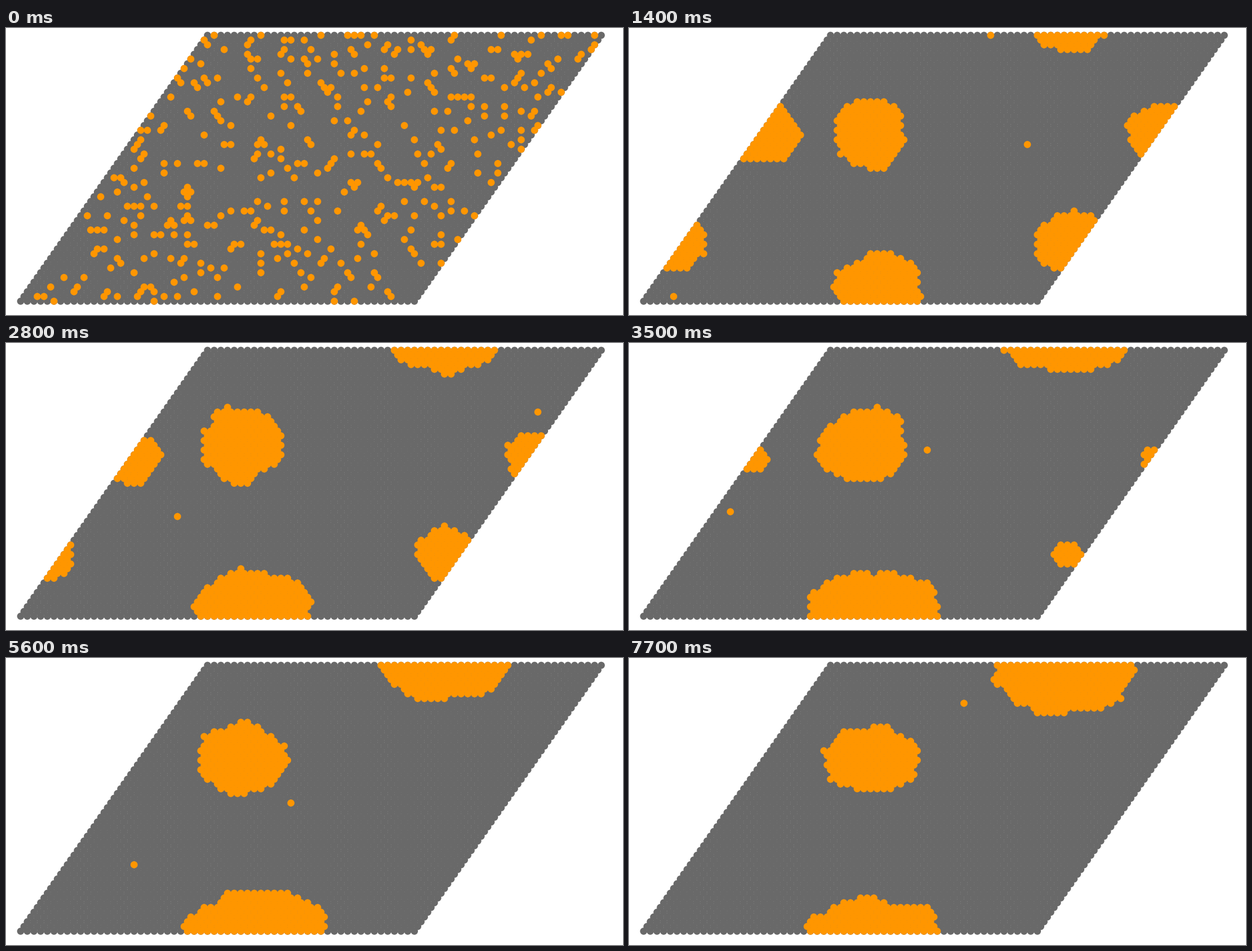
A matplotlib script for the animation above (8 s loop, 1095 by 511 pixels).

```python
import numpy as np
import matplotlib.pyplot as plt
from matplotlib.animation import FuncAnimation
from matplotlib.collections import EllipseCollection

W, H, DPI = 1095, 511, 73
ROWS, COLS = 57, 60
DX, DY, RADIUS = 11.845, 8.455, 6.3
LEFT, TOP = 357.6, 13
GREY, ORANGE = "#696969", "#ff9600"
TICK, HOLD, TICKS = 100, 7, 80      # a new state every 700 ms, 8 s loop
STATES = -(-TICKS // HOLD)
DENSITY = 0.12

rng = np.random.default_rng(12)
row, col = np.mgrid[:ROWS, :COLS]
sites = np.column_stack([(LEFT + DX * (col - row / 2)).ravel(),
                         (TOP + DY * row).ravel()])

# The sheared lattice is periodic in both directions
across = np.array([COLS * DX, 0])
down = np.array([-ROWS * DX / 2, ROWS * DY])
wraps = [i * across + j * down for i in (-1, 0, 1) for j in (-1, 0, 1)]

# Each droplet drifts between keys: state, centre x, centre y, half width, half height
DROPLETS = [
    [(2, 424, 186, 62, 66), (6, 414, 178, 85, 65), (11, 432, 179, 84, 58)],
    [(2, 443, 462, 80, 62), (6, 440, 475, 130, 67), (11, 438, 502, 124, 77)],
    [(2, 240, 188, 66, 54), (4, 224, 205, 50, 46), (6, 224, 205, 0.1, 0.1)],
    [(2, 786, 382, 64, 54), (4, 778, 376, 49, 50), (6, 778, 376, 0.1, 0.1)],
]


def depth(state):
    """1 at a droplet's centre, 0 on its rim, negative outside."""
    best = np.full(len(sites), -np.inf)
    for keys in DROPLETS:
        t, *tracks = np.array(keys).T
        x, y, a, b = (np.interp(state, t, track) for track in tracks)
        for wrap in wraps:
            u, v = ((sites + wrap - (x, y)) / (a, b)).T
            best = np.maximum(best, 1 - np.hypot(u, v))
    return best


def smooth_noise(passes):
    n = rng.normal(size=(ROWS, COLS))
    for _ in range(passes):
        n = sum(np.roll(n, s, (0, 1)) for s in
                [(0, 0), (0, 1), (0, -1), (1, 0), (-1, 0), (1, 1), (-1, -1)])
    n = n.ravel()
    return (n - n.mean()) / n.std()


def densest(values):
    return values >= np.quantile(values, 1 - DENSITY)


def lattice(state):
    if state == 0:
        return densest(rng.random(len(sites)))
    d = depth(state)
    if state == 1:      # clumps about to merge into droplets
        return densest(np.clip(d, -1, 1) + 0.9 * smooth_noise(3))
    mask = d + 0.05 * smooth_noise(2) > 0
    loose = np.flatnonzero(d < -0.4)
    mask[rng.choice(loose, rng.integers(1, 4))] = True
    return mask


states = [lattice(s) for s in range(STATES)]

fig = plt.figure(figsize=(W / DPI, H / DPI), dpi=DPI, facecolor="white")
ax = fig.add_axes([0, 0, 1, 1])
ax.set(xlim=(0, W), ylim=(H, 0))
ax.axis("off")


def dots(points, color):
    size = 2 * RADIUS
    c = EllipseCollection([size], [size], [0], units="xy", offsets=points,
                          offset_transform=ax.transData,
                          facecolors=color, edgecolors="none")
    c.set_snap(False)
    ax.add_collection(c, autolim=False)
    return c


dots(sites, GREY)
lit = dots(sites[states[0]], ORANGE)


def update(i):
    lit.set_offsets(sites[states[i // HOLD]])
    return [lit]


anim = FuncAnimation(fig, update, frames=TICKS, interval=TICK,
                     repeat=True, repeat_delay=0)
plt.show()
```
